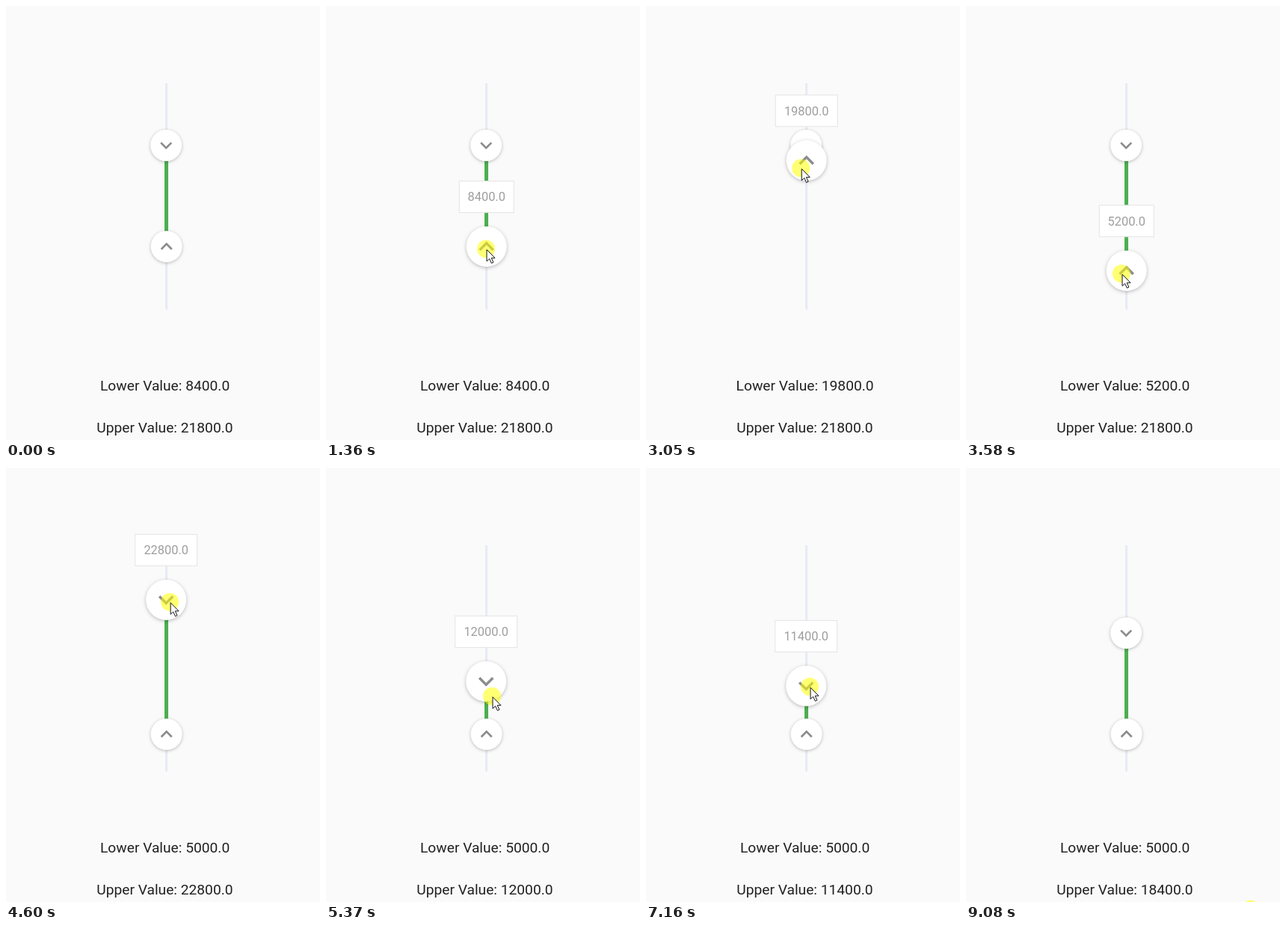
An HTML page for the animation above (9160 ms loop, 420 px wide and 579 px high).

```html
<!DOCTYPE html>
<html lang="en">
<head>
<meta charset="utf-8">
<title>Vertical range slider</title>
<style>
  html, body { margin: 0; width: 100%; height: 100%; overflow: hidden; background: #fafafa; }
  svg { display: block; width: 420px; height: 579px; font-family: Roboto, sans-serif; }
  text { text-anchor: middle; }
  .label { font-size: 19.2px; fill: #212121; }
  .tip text { font-size: 16.4px; fill: #9e9e9e; }
  .tip rect { fill: #fff; stroke: #e4e4e4; }
  .thumb circle { fill: #fff; filter: drop-shadow(0 1.5px 2px rgba(0, 0, 0, .26)); }
  .thumb path { fill: #8c8c8c; }
</style>
</head>
<body>
<svg viewBox="0 0 420 579">
  <rect x="213" y="103" width="3" height="302" fill="#e8eaf6"/>
  <rect id="range" x="212" width="5" fill="#4caf50"/>
  <g id="thumbs">
    <g class="thumb" id="hiThumb"><circle r="21"/><path d="M6.1-4.5 0 1.6-6.1-4.5-8-2.7 0 5.3 8-2.7z"/></g>
    <g class="thumb" id="loThumb"><circle r="21"/><path d="M6.1 4.5 0-1.6-6.1 4.5-8 2.7 0-5.3 8 2.7z"/></g>
  </g>
  <g class="tip" id="hiTip"><rect y="-21" height="42"/><text y="5.8"></text></g>
  <g class="tip" id="loTip"><rect y="-21" height="42"/><text y="5.8"></text></g>
  <text class="label" id="loLabel" x="212.6" y="513"></text>
  <text class="label" id="hiLabel" x="212.4" y="569"></text>
  <g id="pointer">
    <circle r="12" fill="#ff0" fill-opacity=".55"/>
    <path d="M1 1v15.5l3.6-3.3 2.8 6 2.5-1.2-2.7-5.8H12z" fill="#fff" stroke="#111"/>
  </g>
</svg>
<script>
const LOOP = 9160, LAG = 27, STEP = 200;
const TRACK_END = 405.5, PX_PER_UNIT = 0.01007;
const $ = id => document.getElementById(id);
const clamp = (v, min, max) => Math.min(max, Math.max(min, v));

// Pointer stops: time, x, y
const path = [
  [0, 332, 593], [700, 204, 262], [960, 214, 324],
  [1370, 214, 324], [2200, 217, 174], [2420, 224, 118], [2740, 207, 188],
  [2860, 207, 188], [3580, 208, 357], [3640, 208, 358],
  [4130, 208, 202], [4260, 214, 192], [4400, 218, 192],
  [4830, 220, 156], [5050, 221, 146], [5370, 222, 304], [5560, 222, 384],
  [6150, 222, 384], [6300, 222, 396], [6740, 222, 377], [7160, 219, 292], [7470, 220, 226],
  [7740, 220, 226], [8620, 359, 554], [9080, 380.5, 588.5]
];

// Each handle is held once, and follows the pointer within its limits
const lower = { id: 'lo', name: 'Lower', x: 214.7, start: 8400, min: 0, max: 21800, from: 1030, to: 3640, grab: 2.5 };
const upper = { id: 'hi', name: 'Upper', x: 214.2, start: 21800, min: 5000, max: 30000, from: 4270, to: 7740, grab: 6 };

// Monotone cubic through the stops; axis 1 is x, axis 2 is y
function pointer(t, axis) {
  const last = path.length - 1;
  if (t >= path[last][0]) return path[last][axis];
  const i = path.findIndex(p => p[0] > t) - 1;
  const slope = j => j < 0 || j >= last ? 0
    : (path[j + 1][axis] - path[j][axis]) / (path[j + 1][0] - path[j][0]);
  const tangent = j => {
    const a = slope(j - 1), b = slope(j);
    return a * b > 0 ? 2 * a * b / (a + b) : 0;
  };
  const a = path[i], b = path[i + 1];
  const span = b[0] - a[0], u = (t - a[0]) / span, v = 1 - u;
  return a[axis] * v * v * (1 + 2 * u) + b[axis] * u * u * (3 - 2 * u)
    + span * u * v * (v * tangent(i) - u * tangent(i + 1));
}

function valueAt(h, t) {
  if (t < h.from) return h.start;
  const y = pointer(Math.min(t, h.to) - LAG, 2) - h.grab;
  const value = Math.round((TRACK_END - y) / PX_PER_UNIT / STEP) * STEP;
  return clamp(value, h.min, h.max);
}

function drawHandle(h, t) {
  const value = valueAt(h, t), text = value.toFixed(1);
  const y = TRACK_END - value * PX_PER_UNIT;
  const press = clamp(Math.min((t - h.from) / 160, 1 - (t - h.to) / 110), 0, 1);
  $(h.id + 'Thumb').setAttribute('transform', `translate(${h.x} ${y}) scale(${1 + press * 2 / 7})`);
  $(h.id + 'Label').textContent = `${h.name} Value: ${text}`;

  const tip = $(h.id + 'Tip'), [box, caption] = tip.children;
  const width = text.length > 6 ? 83 : 73;
  tip.setAttribute('transform', `translate(${h.x} ${y - 66.3})`);
  tip.setAttribute('opacity', press);
  box.setAttribute('x', -width / 2);
  box.setAttribute('width', width);
  caption.textContent = text;
  return y;
}

let front;
function frame(now) {
  const t = now % LOOP;
  const loY = drawHandle(lower, t), hiY = drawHandle(upper, t);
  $('range').setAttribute('y', hiY);
  $('range').setAttribute('height', Math.max(0, loY - hiY));

  const held = t < upper.from ? 'loThumb' : 'hiThumb';
  if (held !== front) $('thumbs').append($(front = held));

  $('pointer').setAttribute('transform', `translate(${pointer(t, 1)} ${pointer(t, 2)})`);
  requestAnimationFrame(frame);
}
frame(0);
</script>
</body>
</html>
```
